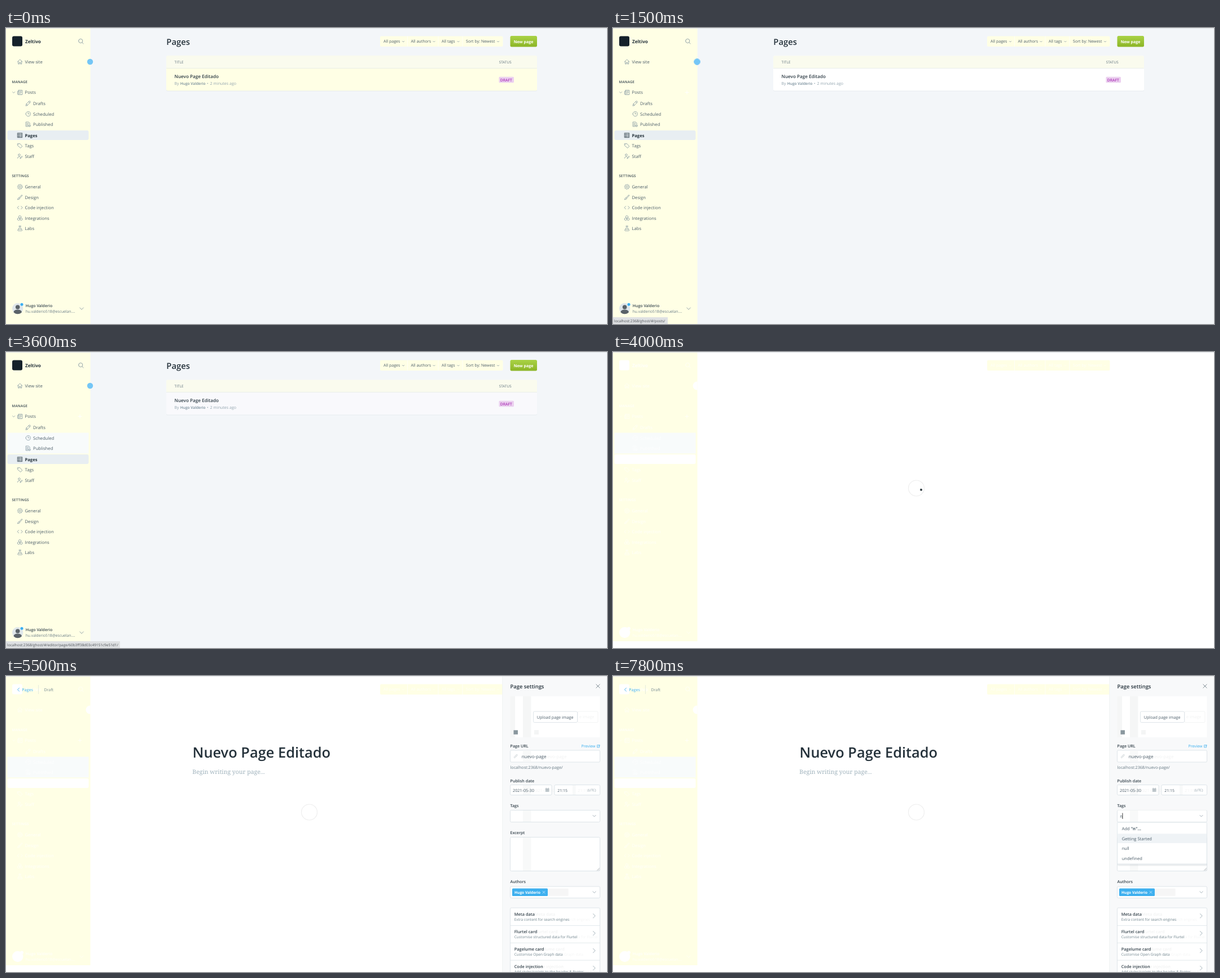
An HTML page for the animation above (8 s loop, 1065x526 px).

```html
<!DOCTYPE html>
<html lang="en">
<head>
<meta charset="utf-8">
<title>Page settings</title>
<style>
html, body { margin: 0; width: 100%; height: 100%; overflow: hidden; background: #fff; }
svg { display: block; width: 100vw; height: 100vh; }
text { font-family: "Open Sans", "Noto Sans", sans-serif; text-rendering: geometricPrecision; white-space: pre; }
.ico { fill: none; stroke-linecap: round; stroke-linejoin: round; }
.faded text { fill: #fff; opacity: .85; }
.faded .ico { stroke: #fff; opacity: .7; }
.faded .solid { fill: #fff; stroke: none; }
.faded .live { display: none; }
</style>
</head>
<body>
<svg id="stage" viewBox="0 0 1065 526" preserveAspectRatio="none"></svg>
<script>
const INK = '#4c5d69', DARK = '#25323b', SOFT = '#7b909c', BLUE = '#3aaeee', LINE = '#dbe3e7', CREAM = '#ffffe5';
const USER = 'Hugo Valderio', MAIL = 'hu.valderio518@escuelan....', SITE = 'Zeltivo';
const LOOP = 8000, TICK = 100;

const text = (x, y, s, size = 7.7, fill = INK, weight = 400, more = '') =>
  `<text x="${x}" y="${y}" font-size="${size}" fill="${fill}" font-weight="${weight}" ${more}>${s}</text>`;
const rect = (x, y, w, h, fill, more = '') =>
  `<rect x="${x}" y="${y}" width="${w}" height="${h}" fill="${fill}" ${more}/>`;
const disc = (x, y, r, fill, more = '') => `<circle cx="${x}" cy="${y}" r="${r}" fill="${fill}" ${more}/>`;
// Icon centred on x, y
const icon = (x, y, d, color = SOFT, w = .75) =>
  `<path class="ico" transform="translate(${x} ${y})" d="${d}" stroke="${color}" stroke-width="${w}"/>`;
const group = (id, body, more = '') => `<g id="${id}" ${more}>${body}</g>`;

const ring = r => `M${-r} 0a${r} ${r} 0 1 0 ${2 * r} 0a${r} ${r} 0 1 0 ${-2 * r} 0`;
const chevron = (w, h) => `M${-w} ${-h}L0 ${h}L${w} ${-h}`;
const side = (w, h) => `M${-w} ${-h}L${w} 0L${-w} ${h}`;
const cross = r => `M${-r} ${-r}L${r} ${r}M${r} ${-r}L${-r} ${r}`;
const gearPath = r => {
  let d = ring(r * .4);
  for (let i = 0; i <= 32; i++) {
    const a = i / 32 * Math.PI * 2, k = i % 4 < 2 ? r : r * .8;
    d += `${i ? 'L' : 'M'}${(Math.cos(a) * k).toFixed(2)} ${(Math.sin(a) * k).toFixed(2)}`;
  }
  return d;
};
const ICONS = {
  home: 'M-4.2 0L0 -4L4.2 0M-3 -1V4H-1V1H1V4H3V-1',
  posts: 'M-2.6 -4H4V4H-3Q-4 4 -4 3V-2H-2.6ZM-2.6 -2V3M-1 -2H2.4M-1 0H2.4M-1 2H1',
  pencil: 'M-4 4L-3.2 1L2 -4Q3 -4.6 3.8 -3.6Q4.6 -2.6 3.8 -2L-1 3.2ZM1 -3L3 -1M-3.2 1L-1 3.2',
  clock: ring(4.1) + 'M0 -2.4V0H2',
  doc: 'M0 4H-4V-4H1L3 -2V-.5M-2.4 -1.6H1M-2.4 .4H0M-2.4 2.2H-.6M.6 2.6a1.8 1.8 0 1 0 3.6 0a1.8 1.8 0 1 0 -3.6 0M1.7 2.6L2.3 3.2L3.3 2',
  pages: 'M-4 -4H4V4H-4ZM-2.6 -2.6H-.6V-.6H-2.6ZM-2.6 1H-.6V2.8H-2.6ZM1 -2.4H2.8M1 -.8H2.8M1 1H2.8M1 2.6H2.8',
  tag: 'M-4 -3.6L0 -3.8L4.2 1L1 4L-4 -.4ZM-2.6 -2.2h.3',
  staff: 'M-3 -2.2a1.8 1.8 0 1 0 3.6 0a1.8 1.8 0 1 0 -3.6 0M-4.2 3.6Q-4 .8 -1.4 .8Q0 .8 .6 1.6M.4 4L1 2.2L3.6 -.2L4.4 .8L2 3.4Z',
  gear: gearPath(4.4),
  brush: 'M-4 4Q-3.6 .6 -1.6 .8Q.4 1.4 -.6 3Q-1.6 4 -4 4M-1.4 .7L3 -4Q4.4 -4.2 4 -2.8L-.4 1.8',
  code: 'M-2 -2.6L-4.5 0L-2 2.6M2 -2.6L4.5 0L2 2.6',
  blocks: 'M0 -4.2L2 -3.2V-1L0 0L-2 -1V-3.2ZM-2.2 0L-.2 1V3L-2.2 4L-4.2 3V1ZM2.2 0L4.2 1V3L2.2 4L.2 3V1Z',
  flask: 'M-1.6 -4.2H1.6M-1.1 -4.2V-1L-4 3.2Q-4 4.2 -3 4.2H3Q4 4.2 4 3.2L1.1 -1V-4.2M-2.8 1.4H2.8'
};

const MENU = [
  ['home', 'View site', 60], ['posts', 'Posts', 114.5], ['pencil', 'Drafts', 134, 1],
  ['clock', 'Scheduled', 152.7, 1], ['doc', 'Published', 171, 1], ['pages', 'Pages', 190.7],
  ['tag', 'Tags', 209.3], ['staff', 'Staff', 227.8], ['gear', 'General', 282.2], ['brush', 'Design', 300.8],
  ['code', 'Code injection', 319.2], ['blocks', 'Integrations', 337.8], ['flask', 'Labs', 356.2]
];
const menuItem = ([kind, label, y, deep]) => {
  const on = label === 'Pages', dx = deep ? 14.5 : 0;
  return icon(24.7 + dx, y, ICONS[kind], on ? '#33434d' : SOFT) +
    text(33.5 + dx, y + 2.8, label, on ? 7.6 : 7.7, on ? DARK : INK, on ? 700 : 400);
};

const sidebar = rect(0, 1, 149.5, 525, CREAM, 'id="sideBg"') +
  rect(11, 14.5, 18, 18, '#15212a', 'rx="3" class="solid"') +
  text(34, 26.5, SITE, 8.2, DARK, 700) +
  icon(132.2, 23, ring(3.6) + 'M2.7 2.7L5 5', SOFT, .8) +
  rect(2.5, 143.5, 144, 37, '#f8fbfb', 'id="hover"') +
  icon(131, 114.5, 'M-3 0H3M0 -3V3', '#fff', 1).replace('<path', '<path id="plus"') +
  rect(2.5, 182, 144, 17, '#e8eef2', 'rx="3" class="solid"') +
  text(10.5, 97.7, 'MANAGE', 6.2, '#394851', 600, 'letter-spacing=".2"') +
  text(10.5, 265.2, 'SETTINGS', 6.2, '#394851', 600, 'letter-spacing=".2"') +
  icon(13.7, 114.5, chevron(2, 1), SOFT, .7) + MENU.map(menuItem).join('') +
  disc(20.7, 498.5, 9.7, '#dfe6ea', 'class="solid"') +
  `<g class="live">${disc(20.7, 496, 3.8, '#5a6268')}<path d="M13.5 505Q14 500.5 20.7 500.5Q27.4 500.5 28 505Q25 508.2 20.7 508.2Q16.5 508.2 13.5 505Z" fill="#5a6268"/></g>` +
  disc(28, 491.3, 2.9, BLUE, 'class="solid" stroke="#fff" stroke-width=".6"') +
  text(34.7, 496.2, USER, 7, '#394851', 600) + text(34.7, 505.8, MAIL, 6.75, '#667985') +
  icon(134, 498.7, chevron(3.2, 1.7), SOFT, .8);

const FILTERS = [[669, 'All pages', 704], [717.5, 'All authors', 758.5], [772, 'All tags', 801.5], [815, 'Sort by: Newest', 872]];
const filters = rect(663, 14.5, 217.5, 18.5, CREAM, 'rx="2"') +
  FILTERS.map(([x, s, cx]) => text(x, 26.3, s, 7.1) + icon(cx, 24.2, chevron(1.6, .8), SOFT, .7)).join('') +
  [711, 765.5, 808.5].map(x => rect(x, 14.5, 1, 18.5, '#fff', 'opacity=".7"')).join('');

const dash = rect(149, 1, 916, 525, '#f3f6f9') +
  text(284.3, 29.8, 'Pages', 14.8, DARK, 600) +
  rect(893.5, 14, 47.5, 19.5, 'url(#green)', 'rx="2.5"') + text(899.7, 26.6, 'New page', 7.1, '#fff', 700) +
  rect(284, 50.5, 657, 62, '#dfe5ea', 'rx="2.5" opacity=".65"') +
  rect(284, 49.5, 657, 62, '#fff', 'rx="2.5" id="row"') +
  rect(284, 49.5, 657, 22, '#fafbee', 'rx="2.5"') + rect(284, 71, 657, .8, '#e6ebe8') +
  text(298.5, 62.8, 'TITLE', 6.3, '#586b77', 500, 'letter-spacing=".15"') +
  text(873.7, 62.8, 'STATUS', 6.2, '#586b77', 500, 'letter-spacing=".15"') +
  text(298.5, 88.6, 'Nuevo Page Editado', 8.17, '#2f3d46', 600) +
  text(298.5, 100.5, 'By', 7, '#93a5af') + text(308.8, 100.5, USER, 6.6, '#748b98', 600) +
  text(356, 100.5, '•', 7, '#93a5af') + text(361.5, 100.5, '2 minutes ago', 7.05, '#93a5af') +
  rect(873.5, 86.7, 26.5, 10.5, '#ebd0ef', 'rx="1.5"') + text(875.8, 94.7, 'DRAFT', 6.7, '#ab35b8', 600);

const spinner = disc(537.5, 242, 14, 'none', 'stroke="#eee" stroke-width="1.2"') +
  disc(537.5, 233, 2, '#343f44', 'id="orbit"');

const editor = icon(22, 24.2, 'M1.5 -3L-1.5 0L1.5 3', BLUE, .9) + text(28.3, 27, 'Pages', 7.1, BLUE) +
  rect(57, 16, .8, 16, '#dfe6dd') + text(67.5, 27.3, 'Draft', 7, '#738790') +
  text(330.5, 144.8, 'Nuevo Page Editado', 25.4, DARK, 600) +
  text(330.3, 173.8, 'Begin writing your page...', 10.5, '#9fb2bc', 400, `style="font-family:'Noto Serif',serif"`) +
  text(1006.5, 504.7, '0 words', 7.1, '#738790') +
  icon(1051, 501.5, ring(4.4) + 'M-1.4 -1Q-1.2 -2.4 0 -2.4Q1.6 -2.2 1.3 -.9Q.9 -.1 0 .4V1M0 2.4v.1', '#8095a0', .7) +
  group('publish', text(1005, 27.3, 'Publish', 7, BLUE) + icon(1033.5, 25, chevron(1.9, 1), BLUE, .7) +
    icon(1052, 24.2, gearPath(4.6), '#3b4850', .9));

const label = (y, s) => text(893.5, y, s, 7.15, '#35434c', 600);
const field = (x, y, w, h) => rect(x, y, w, h, '#fff', `rx="2" stroke="${LINE}" stroke-width=".9"`);
const band = (y, h) => rect(916, y, 14.5, h, '#f8f9f9');
const trail = (x, y, s, size) => text(x + 36, y, s, size, '#f1f2f2') + text(x, y, s, size);

const CARDS = [
  ['Meta data', 'Extra content for search engines'], ['Flurtel card', 'Customise structured data for Flurtel'],
  ['Pagelume card', 'Customise Open Graph data'], ['Code injection', 'Add styles/scripts to the header &amp; footer']
];
const card = ([head, note], i) => {
  const y = 412 + i * 30.9;
  return (i ? rect(893.5, y, 159, .8, LINE) : '') +
    text(937, y + 13.8, head, 7.4, '#f1f2f2', 600) + text(937, y + 23.3, note, 6.5, '#f4f5f5') +
    text(900.7, y + 13.8, head, 7.4, '#35434c', 600) + text(900.7, y + 23.3, note, 6.5, '#738790') +
    icon(1042.3, y + 14.3, side(1.9, 3.7), '#9babb4', .9);
};

const panel = rect(879.5, 1, 190, 525, '#f8f9fa') + rect(879.5, 1, .7, 525, '#eceff0') +
  text(893.5, 22.3, 'Page settings', 9.4, DARK, 600) + icon(1049, 18, cross(3.2), '#66757e', .8) +
  rect(893.5, 36, 159, 73, '#f5f6f6') + rect(902, 36, 14, 73, '#fff') + rect(930.5, 36, 122, 73, '#fff') +
  rect(1013, 63, 36, 19.5, '#fff', 'rx="2" stroke="#f3f4f4"') + text(1016, 75.3, 'e image', 7.2, '#f1f2f2') +
  field(934.5, 63, 78, 19.5) + text(940.7, 75.5, 'Upload page image', 7.2) +
  rect(936, 96, 8, 8, '#f4f5f5') + rect(899.5, 96.3, 7.5, 7.5, '#8a979e') +
  label(127, 'Page URL') + text(1019.5, 127, 'Preview', 6.95, BLUE) +
  icon(1049.5, 124.7, 'M0 -2H-2V2.2H2V.2M.6 -2H2.4V-.2M2.3 -1.9L-.2 .6', BLUE, .7) +
  field(893.5, 132, 159, 21) + band(132.5, 20) +
  icon(903.3, 142.5, 'M-.5 -1.2L1.3 -3Q2.6 -3.4 3 -2.3Q3.3 -1.5 1.2 .4M.5 1.2L-1.3 3Q-2.6 3.4 -3 2.3Q-3.3 1.5 -1.2 -.4M-1 1L1 -1', '#bcc6cb', .7) +
  trail(913.7, 145.5, 'nuevo-page', 8) + text(893.5, 164.5, 'localhost:2368/nuevo-page/', 7.2, '#657883') +
  label(188.5, 'Publish date') + field(893.5, 193.5, 73.5, 18) + field(972, 193.5, 80.5, 18) +
  band(194, 17) + rect(1004, 194, 5.5, 17, '#f8f9f9') +
  trail(898, 205.6, '2021-05-30', 7.28) + trail(977.3, 205.6, '21:15', 6.9) +
  rect(955.7, 199.5, 7, 6.5, '#c6ced2', 'rx="1"') + icon(959.2, 203, 'M-2 -4V-3M2 -4V-3M-2.4 -1.4H2.4M-2 1h4', '#a2adb3', .7) +
  text(1030.5, 205, '(UTC)', 6, '#8496a0') +
  label(233.3, 'Tags') + field(893.5, 238.5, 159, 21) + band(239, 20) + icon(1042.5, 248.7, chevron(2.6, 1.4), '#93a3ac', .8) +
  label(281, 'Excerpt') + field(893.5, 286.5, 159, 60) + band(287, 59) + icon(1049.5, 343.5, 'M-2 2L2 -2M.5 2L2 .5', '#8b969b', .7) +
  label(368.3, 'Authors') + field(893.5, 374, 159, 20.5) + rect(960, 377.7, 36.5, 13, '#f6f6f6') +
  rect(897, 377.5, 63, 13.5, '#3eb0ef', 'rx="1.5"') + text(901, 386.9, USER, 6.6, '#fff', 700) +
  icon(953, 384.3, cross(2), '#d8f0ff', .7) + icon(1042.5, 384.2, chevron(2.6, 1.4), '#93a3ac', .8) +
  field(893.5, 412, 159, 130) + CARDS.map(card).join('');

const ROW = 17.5;
const dropdown = (id, items, active) => {
  const h = items.length * ROW + 4;
  return group(id, rect(894, 262, 158.5, h + 1.5, '#8fa0aa', 'opacity=".18" rx="2"') +
    rect(893.7, 260, 158.6, h, '#fff', `stroke="${LINE}" stroke-width=".8" rx="1"`) +
    items.map((s, i) => (i === active ? rect(894, 262.8 + i * ROW, 158, 16.6, '#eff3f6') : '') +
      text(901.7, 274.3 + i * ROW, s, 7.55)).join(''));
};
const tags = rect(894, 238, 158.5, 1, '#eff2f3') +
  dropdown('listAll', ['Getting Started', 'null', 'tag prueba', 'prueba de etiqueta', 'undefined'], 0) +
  dropdown('listN', ['Add <tspan font-weight="700">"n"...</tspan>', 'Getting Started', 'null', 'undefined'], 1) +
  text(898.3, 251.6, 'n', 7.7, INK, 400, 'id="typed"') + rect(898, 243.5, .9, 10.5, '#222', 'id="caret"');

document.getElementById('stage').innerHTML =
  '<defs><linearGradient id="green" x2="0" y2="1"><stop stop-color="#a9d246"/><stop offset="1" stop-color="#8cb527"/></linearGradient>' +
  '<clipPath id="left"><rect width="149.5" height="526"/></clipPath></defs>' +
  rect(0, 0, 1065, 526, '#fff') + group('dash', dash) + group('side', sidebar) + group('filters', filters) +
  group('beacon', disc(149, 60, 6, '#fff', 'id="halo" stroke="#7cc8f5" stroke-width=".9"') + disc(149, 60, 5.2, '#74c6f6', 'id="dot"')) +
  disc(149, 60, 7.5, '#fff', 'id="mark" clip-path="url(#left)"') +
  group('status', rect(-1, 514, 99, 13, '#dfe1e3', 'id="statusBg"') + text(2, 522.6, '', 6.48, '#4a4f54', 400, 'id="url"')) +
  group('spinner', spinner) + group('editor', editor) + group('panel', panel) + group('tags', tags) +
  rect(0, 0, 1065, 1, '#e1e5e8');

const $ = id => document.getElementById(id);
const show = (id, on) => { $(id).style.display = on ? '' : 'none'; };
const set = (id, name, v) => $(id).setAttribute(name, v);
const at = (steps, t) => steps.reduce((v, [from, next]) => t >= from ? next : v, steps[0][1]);

const URLS = [
  [0, ['', 0]], [1500, ['posts/', 97]], [1700, ['posts?type=scheduled', 153]], [1900, ['posts?type=published', 152]],
  [2200, ['pages/', 98]], [2400, ['editor/page/60b3ff38d03c49151c9e51d1/', 202]], [3700, ['', 0]]
];
const ROWS = [[0, CREAM], [100, '#f9f9fc'], [900, '#fff'], [2400, '#f9f9fc']];
const SLIDE = [[0, 190], [5200, 150], [5300, 86], [5400, 36], [5500, 0]];
const LEAVE = 3700, READY = 4300;

function beacon(t) {
  const p = (t + 1200) % 1300 / 800;
  const on = p > 0 && p < 1;
  show('halo', on);
  if (on) {
    set('halo', 'r', 5.2 + 2.6 * p);
    set('halo', 'opacity', Math.min(1, (1 - p) * 4));
  }
  set('dot', 'fill', p > .3 && p <= 1.05 ? '#86cdf7' : '#74c6f6');
}

function draw(t) {
  const away = t >= LEAVE;
  show('dash', !away);
  show('beacon', !away);
  show('mark', away);
  for (const id of ['side', 'filters']) $(id).classList.toggle('faded', away);
  set('sideBg', 'height', away ? 513 : 525);
  set('row', 'fill', at(ROWS, t));
  show('plus', t >= 1500);
  show('hover', t >= 1700);
  beacon(t);

  const [path, width] = at(URLS, t);
  show('status', width > 0);
  set('statusBg', 'width', width + 1);
  $('url').textContent = 'localhost:2368/ghost/#/' + path;

  show('spinner', away);
  show('orbit', t < READY);
  set('orbit', 'transform', `rotate(${(t - LEAVE) * .36} 537.5 242)`);
  show('editor', t >= READY);
  set('publish', 'opacity', Math.max(0, Math.min(1, (t - 4400) / 500)));

  show('panel', t >= 5200);
  set('panel', 'transform', `translate(${at(SLIDE, t)} 0)`);

  const typed = t >= 7800;
  show('tags', t >= 6900);
  show('listAll', !typed);
  show('listN', typed);
  show('typed', typed);
  show('caret', typed || t < 7400);
  set('caret', 'x', typed ? 902.5 : 898);
}

const start = performance.now();
function frame() {
  const t = (performance.now() - start) % LOOP;
  draw(Math.floor(t / TICK) * TICK);
  requestAnimationFrame(frame);
}
frame();
</script>
</body>
</html>
```
